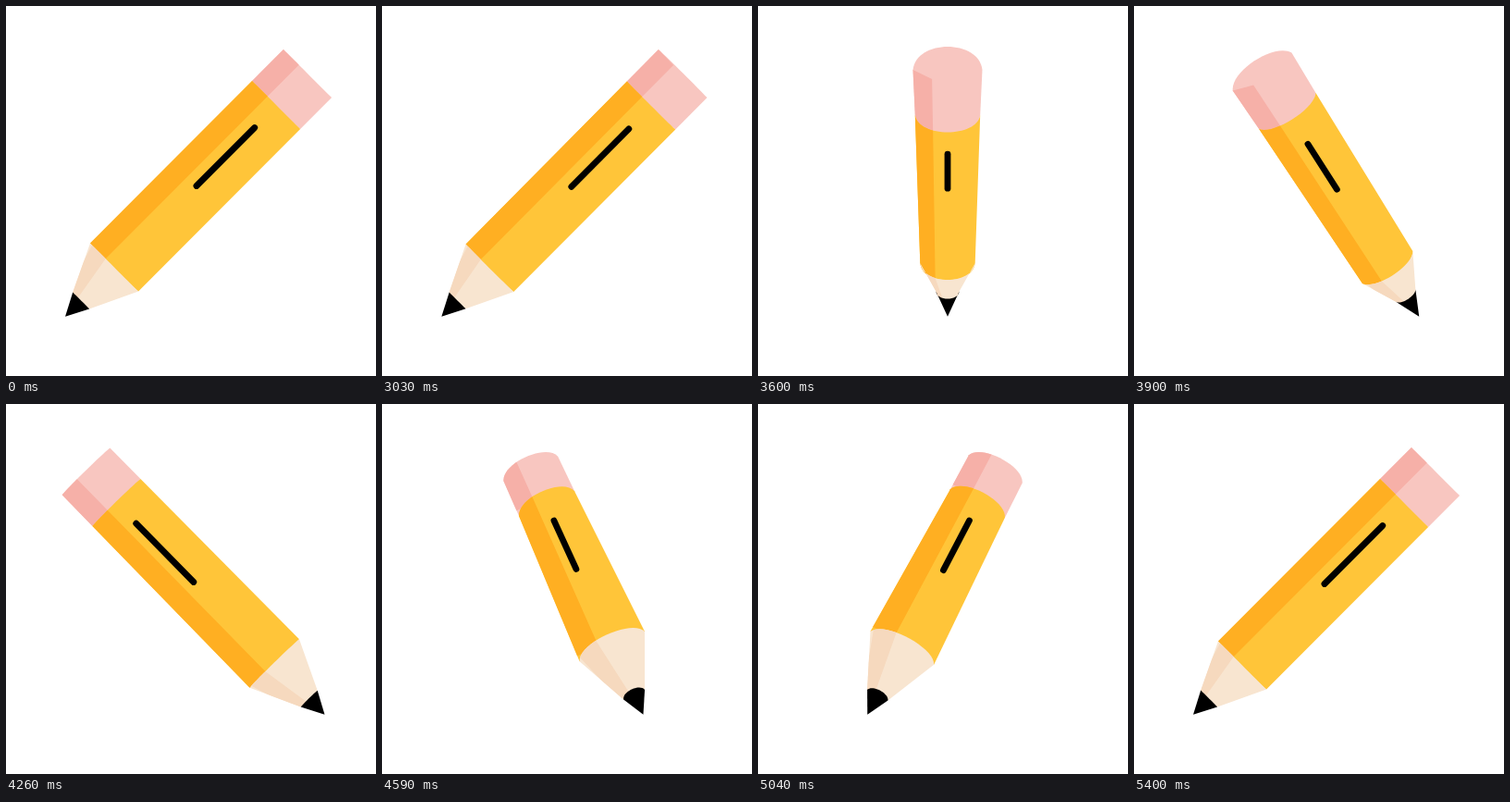
Write an HTML page that moves like this. It is 400 px wide and 400 px high and loops after 5430 ms.

```html
<!DOCTYPE html>
<html lang="en">
<head>
<meta charset="utf-8">
<title>Turning pencil</title>
<style>
html, body { margin: 0; width: 100%; height: 100%; overflow: hidden; background: #fff; }
svg { display: block; width: 100%; height: 100%; }
</style>
</head>
<body>
<svg id="stage" viewBox="0 0 400 400">
  <line id="slot" stroke="#000" stroke-width="6.8" stroke-linecap="round"/>
</svg>
<script>
const LOOP = 5430, HOLD = 3000, TURN = 2400, STEP = 30;
const NS = "http://www.w3.org/2000/svg";
const svg = document.getElementById("stage");
const slot = document.getElementById("slot");

function add(tag, attrs, parent) {
  const el = document.createElementNS(NS, tag);
  for (const k in attrs) el.setAttribute(k, attrs[k]);
  parent.appendChild(el);
  return el;
}

// Each part has a light side and a shaded strip clipped to its outline.
const defs = add("defs", {}, svg);
const parts = [
  ["#f8c6c0", "#f6b0a8"],
  ["#ffc539", "#ffaf22"],
  ["#f8e5d0", "#f6d9be"],
  ["#000", null]
].map(([light, shade], i) => {
  const clip = add("clipPath", { id: "part" + i }, defs);
  return {
    clip: add("path", {}, clip),
    light: add("path", { fill: light }, svg),
    shade: shade && add("path", { fill: shade, "clip-path": `url(#part${i})` }, svg)
  };
});
svg.appendChild(slot);

const str = p => p[0].toFixed(2) + " " + p[1].toFixed(2);
const poly = pts => "M" + pts.map(str).join("L") + "Z";

function draw(angle) {
  const c = Math.cos(angle), s = Math.sin(angle);
  const mix = (base, odd, even) => base + odd * s + even * s * s;

  const top = [205 + c * mix(121, -1.5, -52), mix(73, 0, -4)];
  const tip = [205 - c * mix(141, 0, 10), 335.7];
  const dx = tip[0] - top[0], dy = tip[1] - top[1], len = Math.hypot(dx, dy);
  const v = [dx / len, dy / len], u = [v[1], -v[0]];
  const onAxis = y => [top[0] + dx * (y - top[1]) / dy, y];

  // Rings around the axis; bend is the depth of the visible rim, positive toward the tip.
  const ring = (y, h, bend) => ({
    bend,
    at(a, d) {
      const o = onAxis(y);
      return [0, 1].map(i => o[i] + u[i] * a * h + v[i] * d);
    }
  });
  const tilt = Math.sign(s) * Math.pow(Math.abs(s), 1.6);
  const rings = [
    ring(top[1], mix(36.8, 3.2, -2.5), -Math.abs(tilt) * (s > 0 ? 25 : 18)),
    ring(mix(107, 4.5, 6.5), mix(36.8, 1.7, -3.3), 18.5 * tilt),
    ring(mix(282.5, 10.8, -15.3), mix(36.8, -4.5, -2.6), 18 * tilt),
    ring(mix(318.5, -1.9, -8.2), 12.6, 8 * tilt)
  ];

  // Rim from one side (-1 or 1) across to the other, rounder as the ring opens.
  const round = .6 + .3 * s * s;
  const rim = (r, from, bend) => {
    const d = bend * 4 / 3;
    return "C" + [r.at(from * round, d), r.at(-from * round, d), r.at(-from, 0)].map(str).join(" ");
  };
  const edge = mix(-.36, -.054, -.036);

  parts.forEach((part, i) => {
    const a = rings[i], b = rings[i + 1];
    let d = "M" + str(a.at(-1, 0)) + rim(a, -1, a.bend);
    d += b ? "L" + str(b.at(1, 0)) + rim(b, 1, Math.max(b.bend, 0) + 1) : "L" + str(tip);
    d += "Z";
    part.light.setAttribute("d", d);
    part.clip.setAttribute("d", d);
    if (!part.shade) return;

    const openTop = i === 0 && s > 0;
    const start = openTop ? 10 * s : a.bend * .9;
    const end = b.bend * .9;
    const pts = openTop
      ? [a.at(-1.2, -2 * s), a.at(-1, 0), a.at(edge, start)]
      : [a.at(-1.3, -45), a.at(edge, start - 45), a.at(edge, start)];
    pts.push(b.at(edge, end), b.at(edge, end + 6), b.at(-1.3, end + 6));
    part.shade.setAttribute("d", poly(pts));
  });

  const mid = mix(163, 14, 1.7), half = mix(31.5, -2.6, -10.4);
  const p = onAxis(mid - half), q = onAxis(mid + half), shift = 1.1 * c;
  slot.setAttribute("x1", p[0] + shift);
  slot.setAttribute("y1", p[1]);
  slot.setAttribute("x2", q[0] + shift);
  slot.setAttribute("y2", q[1]);
}

function frame() {
  const t = Math.floor((performance.now() % LOOP) / STEP) * STEP;
  draw(Math.max(0, t - HOLD) / TURN * 2 * Math.PI);
  requestAnimationFrame(frame);
}
frame();
</script>
</body>
</html>
```
